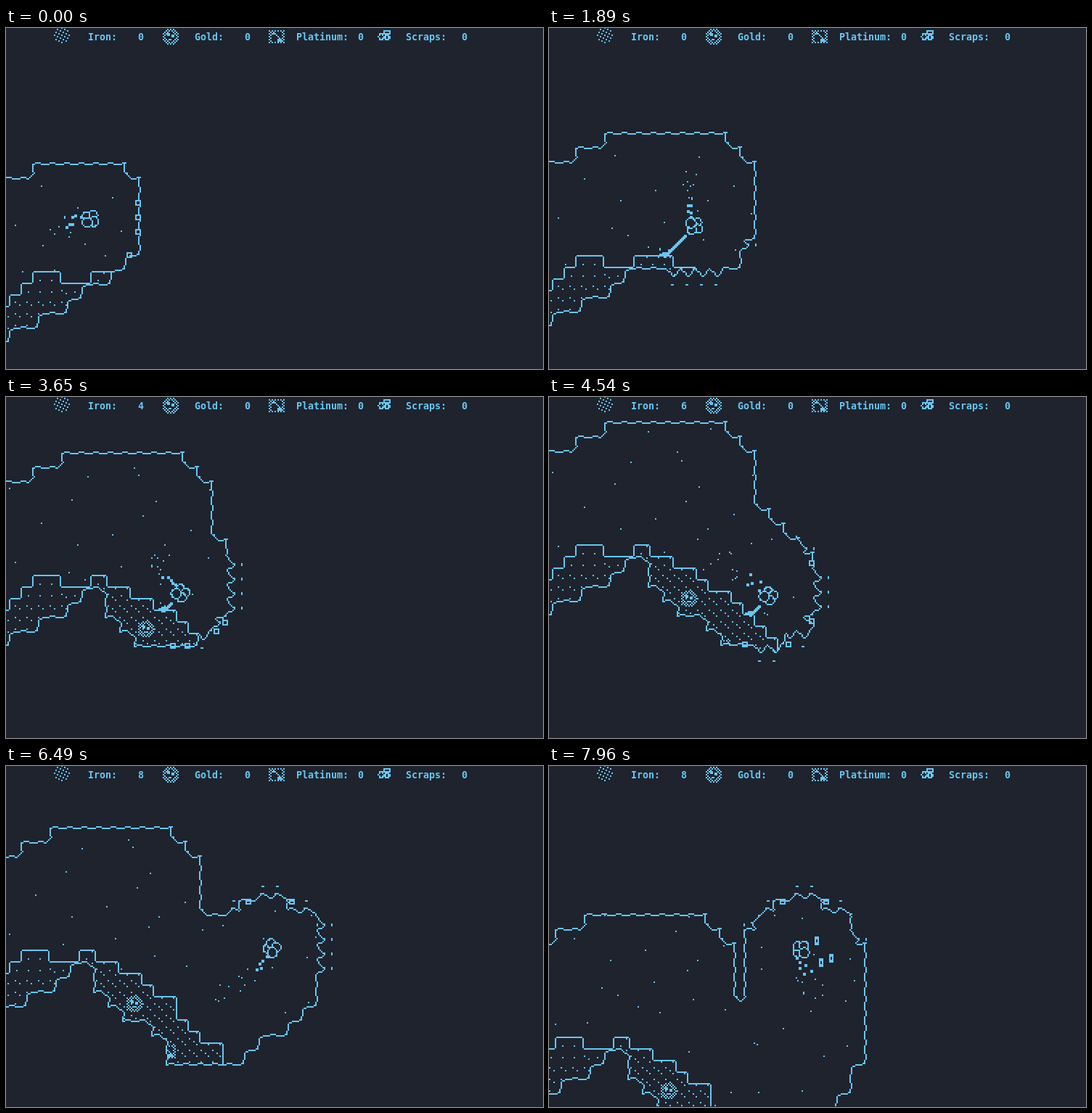
An HTML page with a canvas for the animation above (7.99 s loop, 740 by 470 pixels).

```html
<!DOCTYPE html>
<html lang="en">
<head>
<meta charset="utf-8">
<title>Cave miner</title>
<style>
html, body { margin: 0; width: 740px; height: 470px; overflow: hidden; background: #1e232e; }
canvas, svg { position: absolute; left: 0; top: 0; width: 740px; height: 470px; }
canvas { top: -1px; image-rendering: pixelated; }
text { font: bold 13.3px "DejaVu Sans Mono", monospace; fill: #69c6f0; white-space: pre; }
</style>
</head>
<body>
<canvas id="view" width="370" height="235"></canvas>
<svg viewBox="0 0 740 470">
  <text x="113" y="17">Iron:</text><text id="iron" x="182" y="17">0</text>
  <text x="260" y="17">Gold:</text><text x="329" y="17">0</text>
  <text x="400" y="17">Platinum:</text><text x="485" y="17">0</text>
  <text x="551" y="17">Scraps:</text><text x="628" y="17">0</text>
</svg>
<script>
const W = 370, H = 235, LOOP = 7990;
const BG = 0xff2e231e, INK = 0xfff0c669;
const TILE = 20, RIM = 4, REACH = 82, DIG = 300;
const ORE = 16, ORE_X = 5, ORE_Y = 336, HOLD = 8;

const view = document.getElementById('view').getContext('2d');
const iron = document.getElementById('iron');
const image = view.createImageData(W, H);
const pixels = new Uint32Array(image.data.buffer);
const open = new Uint8Array(W * H), ore = new Uint8Array(W * H), ink = new Uint8Array(W * H);

function layer() {
  const c = document.createElement('canvas');
  c.width = W; c.height = H;
  return c.getContext('2d', { willReadFrequently: true });
}
const caveLayer = layer(), oreLayer = layer();

// Flight path: time, x, y
const route = [
  [-1500, -60, 355], [-900, 30, 311], [-700, 48, 282], [-400, 106, 264], [-60, 107, 264],
  [0, 116, 263], [300, 126, 252], [900, 177, 243.5], [1180, 198, 259], [1640, 199, 280],
  [2300, 203, 319], [2540, 216, 328], [3260, 222, 345], [4080, 262, 377], [4540, 303, 406],
  [5000, 299, 416], [5600, 322, 392], [5900, 346, 375], [6100, 358, 364.7], [6490, 382, 333],
  [7300, 386, 262], [7650, 375, 236.3], [7960, 375, 215]
];

function ship(t) {
  t = Math.max(-1500, Math.min(7959.9, t));
  const i = route.findIndex(r => r[0] > t), a = route[i - 1], b = route[i];
  const f = (t - a[0]) / (b[0] - a[0]);
  return { x: a[1] + (b[1] - a[1]) * f, y: a[2] + (b[2] - a[2]) * f };
}

// The camera trails the ship and never scrolls left of the start
function camera(t) {
  return { x: Math.min(0, 347 - ship(t - 310).x), y: 264 - ship(t - 160).y };
}

function exhaustAngle(t) {
  const a = ship(t - 200), b = ship(t);
  return Math.atan2(a.y - b.y, a.x - b.x);
}

// A rock tile cracks once the ship is in reach and opens a little later
const tiles = new Map();
const key = (i, j) => i * 100 + j;
const samples = [];
for (let t = -1500; t < LOOP; t += 10) samples.push({ t, ...ship(t) });
for (let i = -4; i < 26; i++) for (let j = 0; j < 22; j++) {
  const x = i * TILE, y = 111 + j * TILE;
  const s = samples.find(p => Math.hypot(p.x - x - 10, p.y - y - 10) < REACH);
  tiles.set(key(i, j), { i, j, x, y, touch: s ? s.t : Infinity, from: s });
}

// Ore surface, in blocks below its highest level
function surface(k) {
  if (k < 2) return 2 - k;
  return k < 10 ? +(Math.abs(k - 5) < 2) : Math.max(1, k - 10);
}
// The laser takes one block per column from left to right; every seventh is too hard
function isMined(k, t) {
  return k > 7 && k < 18 && k % 7 !== 0 && t >= 2800 + 350 * (k - 10);
}

function rand(n) {
  const v = Math.sin(n * 127.1 + 11.7) * 43758.5453;
  return v - Math.floor(v);
}

function put(x, y, size = 1, value = 1) {
  x = Math.floor(x); y = Math.floor(y);
  for (let j = y; j < y + size; j++) for (let i = x; i < x + size; i++)
    if (i >= 0 && j >= 0 && i < W && j < H) ink[j * W + i] = value;
}

function ring(cx, cy, rx, ry = rx, solid = false) {
  for (let y = Math.floor(cy - ry - 1); y <= cy + ry + 1; y++)
    for (let x = Math.floor(cx - rx - 1); x <= cx + rx + 1; x++) {
      const d = (Math.hypot((x + .5 - cx) / rx, (y + .5 - cy) / ry) - 1) * Math.min(rx, ry);
      if (Math.abs(d) < .5) put(x, y);
      else if (solid && d < 0) put(x, y, 1, 0);
    }
}

const mineral = {
  iron: (i, j, r) => r < 5.2 && (i + 3 * j + 40) % 5 === 0,
  gold: (i, j, r) => (r < 6 && r > 3.4 && (i + j) & 1) ||
    (j >= -2 && j < 0 && (i === -2 || i === -1)) || (j >= -1 && j < 1 && (i === 1 || i === 2)) || (j === 2 && i > -2 && i < 1),
  platinum: (i, j) => {
    const a = Math.max(Math.abs(i), Math.abs(j));
    return (a > 3 && a < 6 && Math.abs(j) < 5 && (i + j) & 1) || (a < 4 && (i - j === 1 || (i > 0 && j > 1) || (i < 0 && j === -2)));
  }
};

function gem(kind, cx, cy, inWorld) {
  for (let j = -6; j <= 6; j++) for (let i = -6; i <= 6; i++) {
    const x = cx + i, y = cy + j;
    if (inWorld && (x < 0 || x >= W || y < 0 || y >= H || !open[y * W + x])) continue;
    if (mineral[kind](i, j, Math.hypot(i, j))) put(x, y);
  }
}

function begin(c, cx, cy) {
  c.setTransform(1, 0, 0, 1, 0, 0);
  c.clearRect(0, 0, W, H);
  c.setTransform(.5, 0, 0, .5, cx / 2, (cy + 1) / 2);
}

function polygon(c, ...points) {
  c.beginPath();
  points.forEach(p => c.lineTo(...p));
  c.fill();
}

// Direction from the ship to a tile along the longer axis
function outward(tile) {
  const dx = tile.x + 10 - tile.from.x, dy = tile.y + 10 - tile.from.y;
  return Math.abs(dx) > Math.abs(dy) ? [Math.sign(dx), 0] : [0, Math.sign(dy)];
}

function drawCave(c, t) {
  const dug = (i, j) => { const q = tiles.get(key(i, j)); return q && t >= q.touch + DIG; };
  for (const q of tiles.values()) {
    const { i, j, x, y } = q, age = t - q.touch;
    if (age >= DIG) {
      c.fillRect(x - RIM, y - RIM, TILE + 2 * RIM, TILE + 2 * RIM);
      continue;
    }
    if (age > 70) {
      const [ox, oy] = outward(q), px = x + 10 - 11 * ox, py = y + 10 - 11 * oy;
      polygon(c, [px - 16, py], [px, py - 16], [px + 16, py], [px, py + 16]);
    }
    // Bevel rock corners that stick out
    for (const sx of [-1, 1]) for (const sy of [-1, 1])
      if (dug(i + sx, j) && dug(i, j + sy)) {
        const px = x + (sx > 0 ? TILE : 0), py = y + (sy > 0 ? TILE : 0);
        polygon(c, [px, py], [px - sx * 14, py], [px, py - sy * 14]);
      }
  }
}

function buildMasks(t, cx, cy) {
  begin(caveLayer, cx, cy);
  drawCave(caveLayer, t);
  begin(oreLayer, cx, cy);
  for (let k = -1; k < 19; k++) {
    const y = ORE_Y + ORE * (surface(k) + isMined(k, t)) - 1;
    oreLayer.beginPath();
    oreLayer.roundRect(ORE_X + ORE * k - 1, y, ORE + 8, 560 - y, 5);
    oreLayer.fill();
  }

  const a = caveLayer.getImageData(0, 0, W, H).data, b = oreLayer.getImageData(0, 0, W, H).data;
  for (let y = 0; y < H; y++) for (let x = 0; x < W; x++) {
    // Rock faces ripple by one pixel per half tile
    const u = (x - cx / 2 + 200) % 10, v = (y - cy / 2 + 400) % 10;
    const sx = Math.max(0, x - (v < 4)), sy = Math.min(H - 1, y + (u < 4));
    open[y * W + x] = a[(sy * W + sx) * 4 + 3] > 127;
    ore[y * W + x] = b[(y * W + x) * 4 + 3] > 127;
  }
}

function drawEdges() {
  for (let y = 0, p = 0; y < H; y++) for (let x = 0; x < W; x++, p++) {
    if (!open[p]) continue;
    const near = [x ? p - 1 : p, x < W - 1 ? p + 1 : p, y ? p - W : p, y < H - 1 ? p + W : p];
    if (near.some(n => !open[n] || (ore[p] && !ore[n]))) ink[p] = 1;
  }
}

// Cracked tiles show small rings, then flying chips
function drawCracks(t, cx, cy) {
  for (const q of tiles.values()) {
    const age = t - q.touch;
    if (age < 0 || age >= DIG) continue;
    const [ox, oy] = outward(q), x = (q.x + 10 + cx) / 2, y = (q.y + 11 + cy) / 2;
    if (age > 70) {
      put(x + ox * 7, y + oy * 7);
      put(x + ox * 7 - Math.abs(oy), y + oy * 7 - Math.abs(ox));
    } else ring(x - ox * 4, y - oy * 4, 2);
  }
}

function drawDots(cx, cy) {
  const dot = (x, y, inOre) => {
    x = Math.floor(x / 2); y = Math.floor((y + 1) / 2);
    if (x < 0 || x >= W || y < 0 || y >= H) return;
    const p = y * W + x;
    if (open[p] && ore[p] === inOre) ink[p] = 1;
  };
  // Dust drifts at half the camera speed
  const CELL = 50;
  for (let i = 0; i < 10; i++) for (let j = 2; j < 10; j++) {
    const n = i * 10 + j;
    dot((i + rand(n)) * CELL + cx / 2, (j + rand(n + .5)) * CELL + cy / 2, 0);
  }
  for (let row = 0; row < 11; row++) for (let k = -1; k < 20; k++) {
    const single = row === 0 || (row === 1 && (k < 4 || k % 2));
    const spots = single ? [[10, 12]] : [[8, 10], [14, 14]];
    if (k > 7) spots.push([2, 2]);
    for (const [x, y] of spots) dot(ORE_X + ORE * k + x + cx, ORE_Y + ORE * row + y + cy, 1);
  }
}

function drawLaser(t, x, y) {
  if (t < 1000 || t > 5300) return;
  for (let i = 7; i <= 26; i++) {
    const px = Math.floor(x - i), py = Math.floor(y + i), p = py * W + px;
    put(px, py, 2);
    if (open[p] && !ore[p]) continue;
    put(px - 1, py - 2, 3);
    put(px - 3, py - 1, 2);
    for (let n = 0; n < 3; n++) {
      const s = n + 7 * Math.floor(t / 60);
      put(px - 4 + rand(s) * 9, py - 5 + rand(s + .5) * 5);
    }
    return;
  }
}

function drawExhaust(t, cx, cy) {
  const step = 40, last = Math.floor(t / step);
  for (let n = last; n > last - 14; n--) {
    const age = t - n * step, p = ship(n * step);
    const a = exhaustAngle(n * step) + (rand(n) - .5) * 1.1;
    const far = 13 + age * (.03 + .035 * rand(n + .3));
    put((p.x + cx + Math.cos(a) * far) / 2, (p.y + cy + Math.sin(a) * far) / 2, age < 210 ? 2 : 1);
  }
}

function drawShip(x, y, angle) {
  for (let i = 0; i < 4; i++) {
    const a = angle + Math.PI * (.25 + i / 2), r = 2.8 + .2 * i;
    ring(x + Math.cos(a) * 3.2, y + Math.sin(a) * 3.2, r, r, true);
  }
}

function drawHud() {
  gem('iron', 38, 5);
  gem('gold', 113, 6);
  gem('platinum', 186, 6);
  ring(258.5, 6.5, 1.6, 2);
  ring(262.5, 3.5, 2.2, 1.4);
  ring(262.5, 7, 1.6, 1.5);
}

function draw(t) {
  const p = ship(t), cam = camera(t), angle = exhaustAngle(t);
  const cx = 2 * Math.round(cam.x / 2), cy = 2 * Math.round(cam.y / 2);
  const sx = (p.x + cx) / 2, sy = (p.y + cy + 1) / 2;

  ink.fill(0);
  buildMasks(t, cx, cy);
  drawEdges();
  drawDots(cx, cy);
  gem('gold', 96 + cx / 2, 205 + cy / 2, true);
  gem('platinum', 119 + cx / 2, 238 + cy / 2, true);
  drawCracks(t, cx, cy);
  drawLaser(t, sx, sy);
  drawExhaust(t, cx, cy);
  drawShip(sx, sy, angle);
  if (t > 7500)
    for (const [x, y] of [[397, 204], [403, 234], [417, 228]])
      ring((x + cx) / 2, (y + cy) / 2, 1.4, 2.2);
  drawHud();

  for (let i = 0; i < ink.length; i++) pixels[i] = ink[i] ? INK : BG;
  view.putImageData(image, 0, 0);

  let count = 0;
  for (let k = 0; k < 20; k++) count += isMined(k, t - 450);
  iron.textContent = Math.min(HOLD, count);
}

const start = performance.now();
function tick() {
  draw((performance.now() - start) % LOOP);
  requestAnimationFrame(tick);
}
tick();
</script>
</body>
</html>
```
